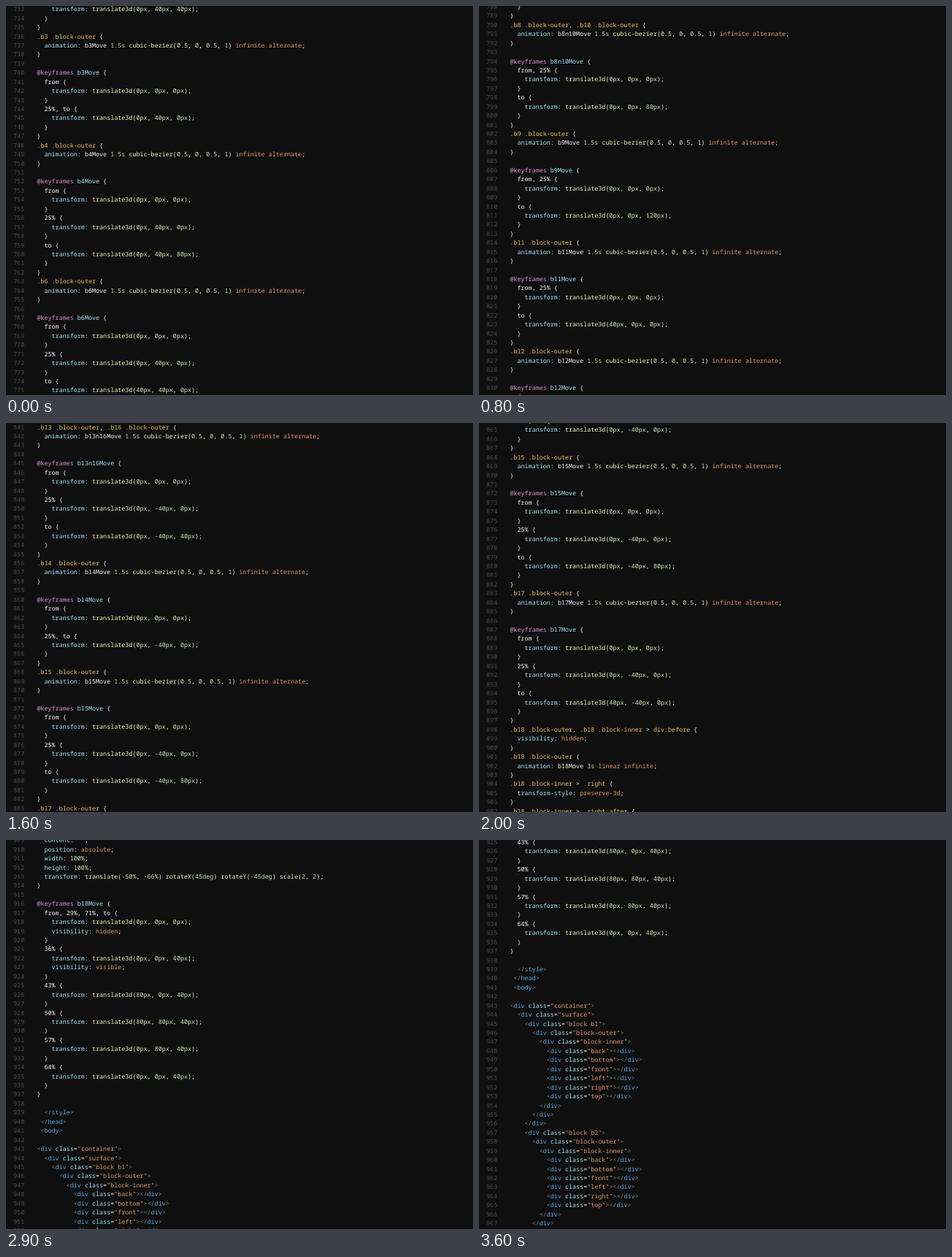
Recreate the animation shown at these times as an HTML page. Size 640x533 px, loop 3.7 s.

```html
<!DOCTYPE html>
<html lang="en">
<head>
<meta charset="utf-8">
<title>Scrolling code</title>
<style>
  html, body { margin: 0; width: 100%; height: 100%; overflow: hidden; background: #0f0f0f; }
  svg { display: block; width: 640px; height: 533px; }
  text {
    font: 500 12.83px "Noto Sans Mono", "DejaVu Sans Mono", monospace;
    font-variant-ligatures: none;
    text-rendering: geometricPrecision;
    white-space: pre;
    fill: #f4f4f4;
  }
  .num { fill: #4c4c4c; font-weight: 400; }
  .sel { fill: #eebf66; }
  .prop { fill: #a4e6ff; }
  .at { fill: #dc90d8; }
  .fn { fill: #f6f6b8; }
  .val { fill: #c8e8b0; }
  .str { fill: #e6966a; }
  .tag { fill: #58a8ec; }
  .edge { fill: #808080; }
</style>
</head>
<body>
<svg viewBox="0 0 640 533"><g transform="scale(.6545)"><g id="page"></g></g></svg>
<script>
const FIRST = 733, LINE = 19, BASE = 11, CHAR = 7.698;
const NUM_X = 15.4, CODE_X = 64.8, SWATCH = 16.8;
const LOOP = 3700;
const page = document.getElementById("page");

// ---- the document ----
const move = (...v) => `    transform: translate3d(${v.map(n => n + "px").join(", ")});`;
const stop = (key, ...body) => [`  ${key} {`, ...body, "  }"];
const still = move(0, 0, 0);
const rule = (sel, ...body) => [sel + " {", ...body.map(s => "  " + s), "}"];

function block(ids, ...stops) {
  const name = "b" + ids.join("n") + "Move";
  return [
    ...rule(ids.map(i => `.b${i} .block-outer`).join(", "),
      `animation: ${name} 1.5s cubic-bezier(0.5, 0, 0.5, 1) infinite alternate;`),
    "",
    `@keyframes ${name} {`, ...stops.flat(), "}"
  ];
}
const late = (id, end) => block([].concat(id), stop("from, 25%", still), stop("to", move(...end)));
const early = (id, mid) => block([id], stop("from", still), stop("25%, to", move(...mid)));
const three = (id, mid, end) => block([].concat(id),
  stop("from", still), stop("25%", move(...mid)), stop("to", move(...end)));

const cube = n => [
  `    <div class="block b${n}">`,
  '      <div class="block-outer">',
  '        <div class="block-inner">',
  ...["back", "bottom", "front", "left", "right", "top"].map(s => `          <div class="${s}"></div>`),
  "        </div>", "      </div>", "    </div>"
];

const down = [0, 40, 0], up = [0, -40, 0];
const lines = [
  move(0, 40, 40), "  }", "}",
  ...early(3, down),
  ...three(4, down, [0, 40, 80]),
  ...three(6, down, [40, 40, 0]),
  ...late(7, [0, 0, 40]),
  ...late([8, 10], [0, 0, 80]),
  ...late(9, [0, 0, 120]),
  ...late(11, [40, 0, 0]),
  ...three(12, up, [-40, -40, 0]),
  ...three([13, 16], up, [0, -40, 40]),
  ...early(14, up),
  ...three(15, up, [0, -40, 80]),
  ...three(17, up, [40, -40, 0]),
  ...rule(".b18 .block-outer, .b18 .block-inner > div:before", "visibility: hidden;"),
  ...rule(".b18 .block-outer", "animation: b18Move 3s linear infinite;"),
  ...rule(".b18 .block-inner > .right", "transform-style: preserve-3d;"),
  ...rule(".b18 .block-inner > .right:after",
    "background-image: radial-gradient(50% 50% at center, ■#ffffff 40%, □rgba(255, 255, 255, 0));",
    'content: "";', "position: absolute;", "width: 100%;", "height: 100%;",
    "transform: translate(-50%, -66%) rotateX(45deg) rotateY(-45deg) scale(2, 2);"),
  "",
  "@keyframes b18Move {",
  ...stop("from, 29%, 71%, to", still, "    visibility: hidden;"),
  ...stop("36%", move(0, 0, 40), "    visibility: visible;"),
  ...stop("43%", move(80, 0, 40)),
  ...stop("50%", move(80, 80, 40)),
  ...stop("57%", move(0, 80, 40)),
  ...stop("64%", move(0, 0, 40)),
  "}", "",
  "  </style>", " </head>", " <body>", "",
  '<div class="container">', '  <div class="surface">',
  ...cube(1), ...cube(2)
];

// ---- highlighting: a line becomes [text, class] pairs ----
const scan = (s, re, kind) => s.match(re).map(t => [t, kind(t)]);

function valueKind(t, next) {
  if (/^["#]/.test(t)) return "str";
  if (/^-?\d/.test(t)) return "val";
  if (!/^[a-z]/.test(t) || t === "at" || /Move$/.test(t)) return "";
  return next === "(" ? "fn" : "str";
}

function tokens(s) {
  if (s[0] === "<") return scan(s, /<\/?|>|"[^"]*"|\w+|./g, t =>
    /[<>]/.test(t) ? "edge" : t[0] === '"' ? "str" : t === "class" ? "prop" : /\w/.test(t) ? "tag" : "");
  if (s[0] === ".") return scan(s, /[.\w:-]+|[^.\w]+/g, t => /\w/.test(t) ? "sel" : "");
  if (s[0] === "@") {
    const [rule, name, brace] = s.split(" ");
    return [[rule, "at"], [" " + name, "prop"], [" " + brace, ""]];
  }
  const pair = s.match(/^([a-z-]+)(: )(.+)$/);
  if (!pair) return [[s, ""]];
  const parts = pair[3].match(/"[^"]*"|#\w+|[a-z][\w-]*|-?\d[\w.]*%?|./gi);
  return [[pair[1], "prop"], [pair[2], ""], ...parts.map((t, i) => [t, valueKind(t, parts[i + 1])])];
}

// ---- drawing ----
function add(parent, tag, attrs, text) {
  const el = document.createElementNS("http://www.w3.org/2000/svg", tag);
  for (const k in attrs) el.setAttribute(k, attrs[k]);
  if (text) el.textContent = text;
  return parent.appendChild(el);
}

function swatch(x, y, fill) {
  add(page, "rect", { x: x + 3.5, y: y - 10.3, width: 9.8, height: 9.8, fill, stroke: "#eee", "stroke-width": 1.4 });
}

lines.forEach((line, i) => {
  const y = BASE + i * LINE, code = line.trimStart();
  add(page, "text", { class: "num", x: NUM_X, y }, String(FIRST + i));
  if (!code) return;
  let x = CODE_X + (line.length - code.length) * CHAR;
  const row = add(page, "text", { x, y });
  let gap = 0;
  for (const [t, kind] of tokens(code)) {
    if (t === "■" || t === "□") {
      swatch(x, y, t === "■" ? "#fff" : "none");
      x += gap = SWATCH;
      continue;
    }
    add(row, "tspan", gap ? { class: kind, dx: gap } : { class: kind }, t);
    gap = 0;
    x += t.length * CHAR;
  }
});

// ---- scrolling: [time, distance] of each wheel turn ----
const turns = [
  [100, 150], [300, 200], [400, 200], [500, 200], [600, 150], [800, 150],
  [1000, 150], [1100, 200], [1200, 200], [1300, 150],
  [1500, 150], [1600, 150], [1700, 150], [1800, 150], [2000, 150],
  [2200, 150], [2300, 150], [2400, 150], [2500, 150],
  [2700, 150], [2900, 100], [3000, 150], [3200, 100], [3600, 50]
];

function draw(t) {
  const top = turns.reduce((sum, [at, d]) => at <= t ? sum + d : sum, 0);
  page.setAttribute("transform", `translate(0 ${-top})`);
}

const start = performance.now();
function tick() {
  draw((performance.now() - start) % LOOP);
  requestAnimationFrame(tick);
}
tick();
</script>
</body>
</html>
```
